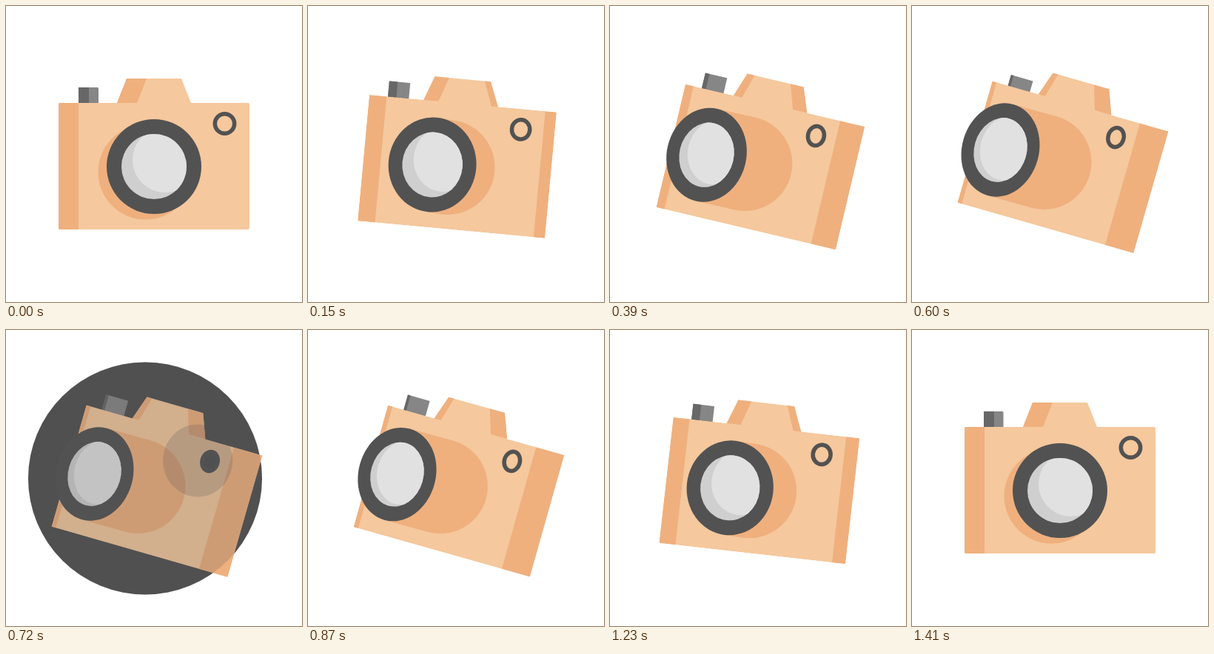
These frames come from a looping animation (400x400 px, 2470 ms). An HTML page with a canvas:

```html
<!DOCTYPE html>
<html lang="en">
<head>
<meta charset="utf-8">
<title>Camera</title>
<style>
  html, body { margin: 0; width: 100%; height: 100%; overflow: hidden; background: #fff; }
  canvas { display: block; width: 100vw; height: 100vh; }
</style>
</head>
<body>
<canvas id="stage"></canvas>
<script>
const LOOP = 2470, STEP = 30, TURN = 600, BACK = 810, END = 1410;
const FLASH = { start: 630, peak: 720, second: 699, stop: 825 };
const LIGHT = '#f5c89d', SHADE = '#efb07e', DARK = '#525252', BURST = '#505050';
const cv = document.getElementById('stage');
const ctx = cv.getContext('2d');

const clamp = v => Math.min(1, Math.max(0, v));
const mix = (a, b, k) => a + (b - a) * k;

function poly(color, ...pts) {
  ctx.fillStyle = color;
  ctx.beginPath();
  pts.forEach(([x, y]) => ctx.lineTo(x, y));
  ctx.fill();
}

function oval(x, y, rx, ry, color) {
  ctx.fillStyle = color;
  ctx.beginPath();
  ctx.ellipse(x, y, rx, ry, 0, 0, 7);
  ctx.fill();
}

// How far the camera is turned: 0 faces front, 1 is the full turn
function turnAt(t) {
  if (t < TURN) return Math.sin(t / TURN * Math.PI / 2);
  if (t < BACK) return 1;
  if (t < END) return Math.cos((t - BACK) / (END - BACK) * Math.PI / 2);
  return 0;
}

function pressAt(t) {
  return 6.5 * Math.sin(Math.PI * clamp((t - 450) / 240));
}

function burst(t, start) {
  if (t < start) return;
  const u = clamp((t - start) / (FLASH.peak - FLASH.start));
  oval(275 - 87 * u ** 1.17, 178 - 15.2 * u + 37.7 * u * u,
    mix(13.3, 158, u), mix(16, 157, u), BURST);
}

function drawButton(s, t) {
  const rest = t >= END ? 1 : 0;
  const x = mix(27, 22, s) - rest, w = mix(27, 30.8, s) - rest * 0.5;
  const y = -21 + pressAt(t);
  ctx.fillStyle = '#868686';
  ctx.beginPath();
  ctx.roundRect(x, y, w, 24, 1.5 * (1 - s));
  ctx.fill();
  ctx.fillStyle = '#676767';
  ctx.fillRect(x, y, mix(14, 3.5, s ** 1.5), 24);
}

function drawHump(s) {
  const at = (front, turned, y) => [mix(front, turned, s), y];
  const top = -33;
  const tl = at(92, 75.8, top), tr = at(166, 154.6, top);
  const bl = at(79, 64.8, 0), br = at(179, 167.2, 0);
  poly(LIGHT, tl, tr, br, [br[0], 2], [bl[0], 2], bl);
  poly(SHADE, tl, at(119, 83, top), at(106, 74, 0), bl);
  poly(SHADE, at(166, 133.4, top), tr, br, at(179, 144, 0));
}

function drawBody(s, w) {
  ctx.save();
  ctx.beginPath();
  ctx.roundRect(0, 0, w, 171, 2 * (1 - s));
  ctx.clip();
  ctx.fillStyle = LIGHT;
  ctx.fillRect(0, 0, w, 171);
  ctx.fillStyle = SHADE;
  ctx.fillRect(0, 0, mix(27, 6, s ** 1.85), 171);
  ctx.fillRect(w - 40 * s, 0, 40 * s, 171);
  ctx.restore();
}

function drawLens(s, w) {
  const x = w / 2 - 87.6 * s, y = mix(86, 86.5, s);
  const bx = w / 2 - mix(11.5, 26.4, s ** 2.5), by = 86 + 7.5 * (1 - s) ** 3;
  // Barrel
  oval(bx, by, 64, 64, SHADE);
  poly(SHADE, [x, y - 64], [bx, by - 64], [bx, by + 64], [x, y + 64]);
  oval(x, y, mix(64, 52, s), 64, DARK);
  // Glass
  const rx = mix(44, 35.5, s);
  oval(x, y, rx, 44, '#cfcfcf');
  ctx.save();
  ctx.clip();
  const k = s ** 3;
  oval(x + mix(15, 7.5, k), y - mix(9, 4.5, k), rx, 44, '#e1e1e1');
  ctx.restore();
}

function drawRing(s, filled) {
  const x = mix(224.5, 181.5, s), y = mix(28, 27.2, s), rx = mix(13.2, 10.5, s);
  if (filled) oval(x, y, rx, 13.2, BURST);
  ctx.strokeStyle = DARK;
  ctx.lineWidth = 5.5;
  ctx.beginPath();
  ctx.ellipse(x, y, rx, 13.2, 0, 0, 7);
  ctx.stroke();
}

function draw(t) {
  const s = turnAt(t), w = mix(258, 247.5, s);
  const flashing = t >= FLASH.start && t < FLASH.stop;
  ctx.fillStyle = '#fff';
  ctx.fillRect(0, 0, 400, 400);
  if (flashing) burst(t, FLASH.start);

  ctx.save();
  ctx.translate(200 + 4 * s, 216.5 + 1.2 * s);
  ctx.rotate(16 * s ** 1.15 * Math.PI / 180);
  ctx.translate(-w / 2, -85.5);
  drawButton(s, t);
  drawHump(s);
  drawBody(s, w);
  drawLens(s, w);
  drawRing(s, flashing);
  ctx.restore();

  if (flashing) {
    const fade = clamp((t - FLASH.peak) / (FLASH.stop - FLASH.peak));
    ctx.globalAlpha = 0.21 * (1 - fade);
    burst(t, FLASH.start);
    burst(t, FLASH.second);
    ctx.globalAlpha = 1;
  }
}

function fit() {
  const dpr = window.devicePixelRatio || 1;
  cv.width = Math.round(innerWidth * dpr);
  cv.height = Math.round(innerHeight * dpr);
  ctx.setTransform(cv.width / 400, 0, 0, cv.height / 400, 0, 0);
}

let begin;
function tick(now) {
  begin ??= now;
  const t = (now - begin) % LOOP;
  draw(Math.floor(t / STEP) * STEP);
  requestAnimationFrame(tick);
}

addEventListener('resize', fit);
fit();
draw(0);
requestAnimationFrame(tick);
</script>
</body>
</html>
```
